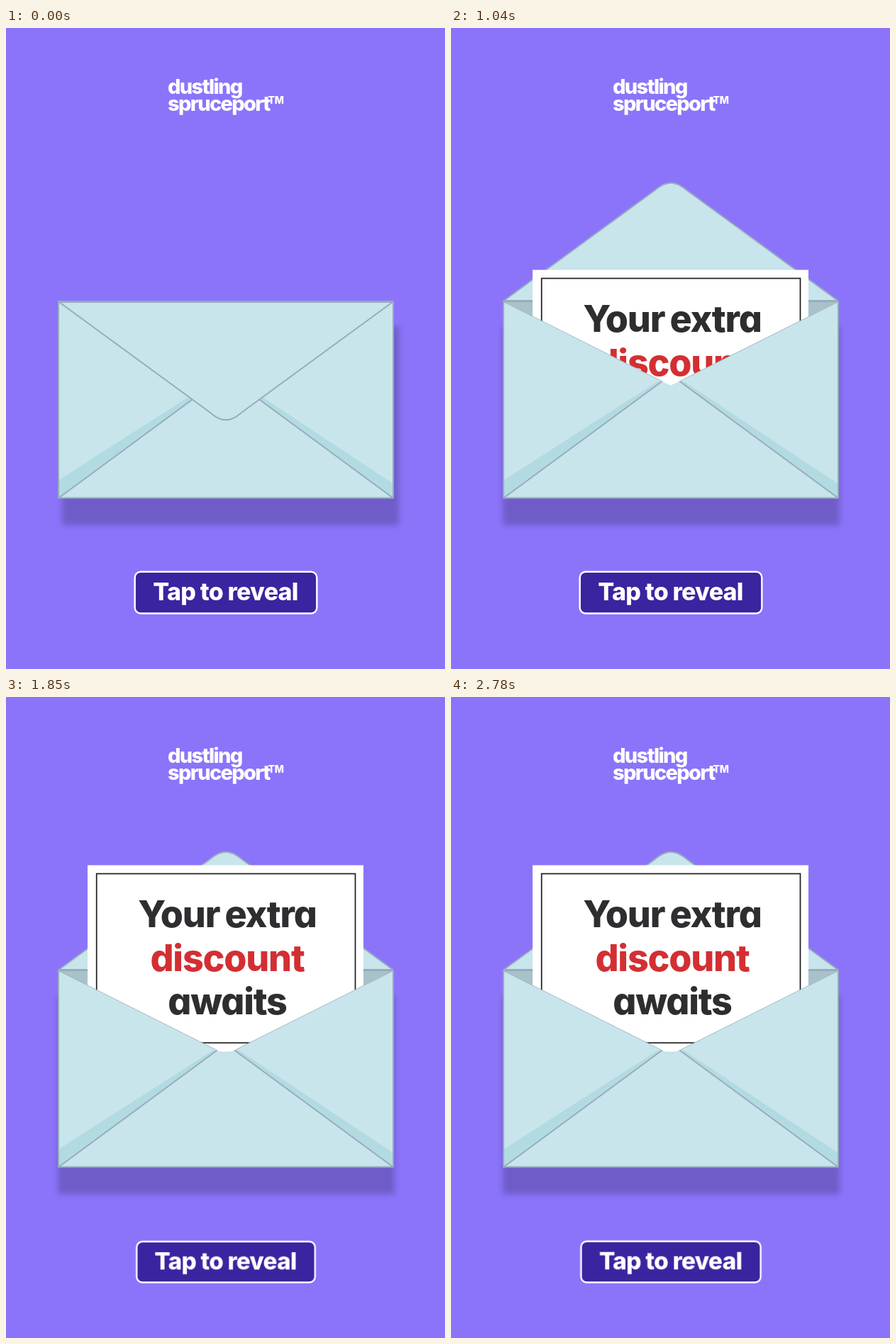
Animation of 619x905 px, one loop 2810 ms. Source, as an HTML page:

```html
<!DOCTYPE html>
<html lang="en">
<head>
<meta charset="utf-8">
<title>Tap to reveal</title>
<style>
  html, body { margin: 0; width: 100%; height: 100%; overflow: hidden; background: #8b74fa; }
  svg { display: block; width: 619px; height: 905px; }
  text { font-family: Inter, "Open Sans", sans-serif; font-weight: 800; }

  .paper { fill: #c7e5eb; }
  .line { stroke: #98abbe; stroke-width: 2; stroke-linejoin: round; }
  .fold { fill: #b2dbe1; }
  .shadow { fill: #000; opacity: .2; filter: url(#soft); }
  .logo { fill: #fff; font-size: 29px; letter-spacing: -1.7px; }
  .logo .mark { font-size: 14px; letter-spacing: -.3px; }
  .message { fill: #2f2d30; font-size: 52px; letter-spacing: -1.2px; word-spacing: -3px; text-anchor: middle; font-feature-settings: "cv11"; }
  .message .hot { fill: #d32f33; }
  .label { fill: #fff; font-size: 34px; letter-spacing: -.8px; text-anchor: middle; }

  .shadow, .closed, .open, .card, .button { animation: 2810ms infinite; }
  .shadow { animation-name: settle; animation-timing-function: step-end; }
  .closed { animation-name: hide; animation-timing-function: step-end; }
  .open { animation-name: show; animation-timing-function: step-end; }
  .card { animation-name: rise; }
  .button { animation-name: pulse; transform-origin: 310px 825px; }

  /* 30 ms */
  @keyframes settle {
    0% { transform: translateX(6px); }
    1.0676%, 100% { transform: none; }
  }
  /* 800 ms */
  @keyframes hide { 0% { opacity: 1; } 28.4697%, 100% { opacity: 0; } }
  @keyframes show { 0% { opacity: 0; } 28.4697%, 100% { opacity: 1; } }
  /* 800 to 1520 ms */
  @keyframes rise {
    0% { transform: translateY(156px); animation-timing-function: step-end; }
    28.4697% { transform: translateY(156px); animation-timing-function: steps(24); }
    54.0925%, 100% { transform: translateY(0); }
  }
  /* 1850, 2270 and 2810 ms */
  @keyframes pulse {
    0% { transform: scale(1); animation-timing-function: step-end; }
    65.8362% { transform: scale(.98); animation-timing-function: steps(14); }
    80.7829% { transform: scale(.9216); animation-timing-function: steps(18); }
    100% { transform: scale(.991); }
  }
</style>
</head>
<body>
<svg viewBox="0 0 619 905" xmlns="http://www.w3.org/2000/svg">
  <defs>
    <filter id="soft" x="-10%" y="-10%" width="120%" height="120%">
      <feGaussianBlur stdDeviation="4"/>
    </filter>
    <clipPath id="pocket"><path d="M74 0V387L309.500 505L546 387V0Z"/></clipPath>
  </defs>

  <rect width="619" height="905" fill="#8b74fa"/>

  <g class="logo">
    <text x="228" y="93">dustling</text>
    <text x="228" y="117">spruceport</text>
    <text class="mark" x="369.500" y="107">TM</text>
  </g>

  <rect class="shadow" x="73" y="421" width="475" height="281"/>

  <path class="open paper line" d="M74.500 385L287 229.500C296 222 302 218.800 310 218.800S324 222 333 229.500L545.500 385Z"/>

  <!-- envelope front -->
  <rect class="paper" x="74" y="387" width="472" height="277"/>
  <path class="fold" d="M75 638L290 500L298 498L75 663Z"/>
  <path class="fold" d="M545 643L330 500L322 498L545 663Z"/>
  <path class="line" fill="none" d="M75 663L298 498.500M545 663L322 498.500"/>
  <path class="open" fill="#a9c1ca" d="M74 385H546V387L309.500 505L74 387Z"/>
  <rect class="line" fill="none" x="74" y="386" width="472" height="277.500"/>

  <g class="open">
    <path class="line" d="M74 385H546"/>
    <g clip-path="url(#pocket)">
      <path class="paper" d="M115 440V500H504V440L310 505Z"/>
      <g class="card">
        <rect x="115" y="237.500" width="389" height="263" fill="#fff"/>
        <rect x="127.700" y="249.500" width="364.800" height="238.800" fill="none" stroke="#1c1b1d" stroke-width="1.700"/>
        <g class="message">
          <text x="312" y="325">Your extra</text>
          <text class="hot" x="312" y="386.500">discount</text>
          <text x="312" y="447.500">awaits</text>
        </g>
      </g>
    </g>
    <path fill="none" stroke="#a3bac6" d="M75 387L298 499M545 387L322 499"/>
  </g>

  <path class="closed paper line" d="M75 387L286 541.500C296 550 302 553.300 310 553.300S324 550 334 541.500L545 387Z"/>

  <g class="button">
    <rect x="181.700" y="767.700" width="256.600" height="58.800" rx="8" fill="#3b24a0" stroke="#fff" stroke-width="2.400"/>
    <text class="label" x="309.500" y="808">Tap to reveal</text>
  </g>
</svg>
</body>
</html>
```
